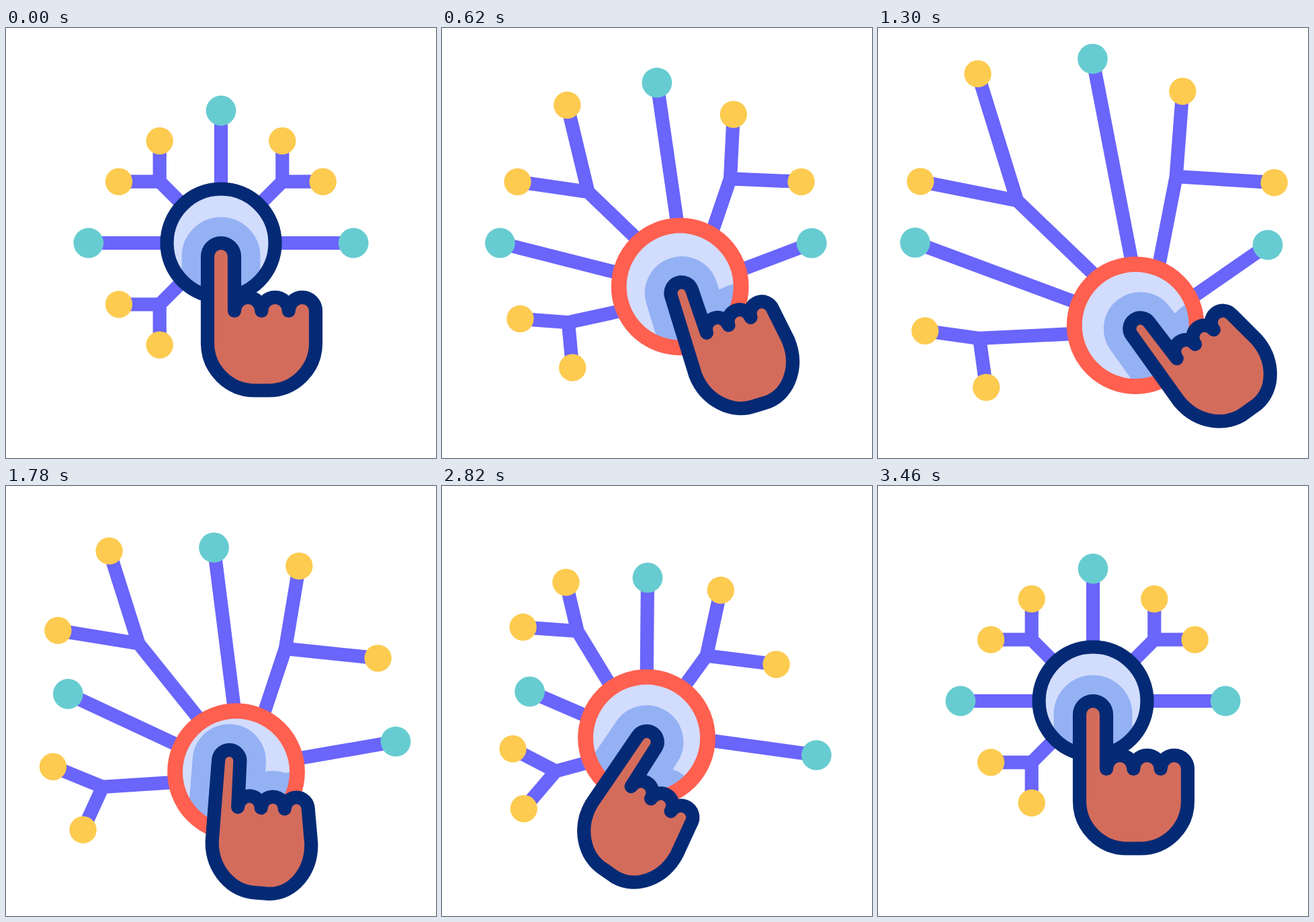
An HTML page for the animation above (3.6 s loop, 640x640 px).

```html
<!DOCTYPE html>
<html lang="en">
<head>
<meta charset="utf-8">
<title>Touch network</title>
<style>
html, body { margin: 0; width: 100%; height: 100%; overflow: hidden; background: #fff; }
svg { display: block; width: 100vw; height: 100vh; }
</style>
</head>
<body>
<svg viewBox="0 0 640 640">
  <defs><clipPath id="clip"><circle id="clipDisc"/></clipPath></defs>
  <path id="wires" fill="none" stroke="#6a65fb" stroke-width="20.2"/>
  <g id="dots"></g>
  <circle id="disc" fill="#d2dcfd"/>
  <g clip-path="url(#clip)">
    <path id="shade" fill="#94b1f4" stroke="#94b1f4" stroke-width="77" stroke-linejoin="round"/>
  </g>
  <circle id="ring" fill="none"/>
  <path id="hand" fill="#d46c5c" stroke="#042a75" stroke-width="20.2" stroke-linejoin="round"/>
</svg>
<script>
const LOOP = 3600, KEYS = [0, 1200, 2400, 3435], PRESS = 300;
const TEAL = '#67ccd1', YELLOW = '#fdcb50';
const NAVY = [4, 42, 117], RED = [255, 96, 80];
const el = id => document.getElementById(id);
const clamp = v => Math.min(1, Math.max(0, v));
const ease = v => { v = clamp(v); return v * v * (3 - 2 * v); };
const mix = (a, b, p) => a.map((v, i) => v + (b[i] - v) * p);
const set = (node, attrs) => { for (const k in attrs) node.setAttribute(k, attrs[k]); };
const fmt = p => p.map(v => v.toFixed(2)).join(' ');

// Each track holds three poses: rest, pulled right, pulled left.
const ringTrack = [[320, 320], [385, 443.3], [295.8, 406.3]];
const handTrack = [[376.5, 426.5, 0], [488.4, 477.6, -43], [269.1, 509.3, 45]];

// root: offset of the wire's end from the ring centre.
const branches = [
  { root: [[0, -68], [0, -66], [0, -80]],
    tips: [[[320, 123], [319.9, 43.8], [298.1, 144.1]]] },
  { root: [[-64, 0], [-64, -25], [-64, -34]],
    tips: [[[122.8, 320], [53.6, 319.9], [135, 298.1]]] },
  { root: [[64, 0], [64, -28], [64, -1]],
    tips: [[[517.2, 320], [580, 320.4], [580, 446.3]]] },
  { root: [[-50, -50], [-54, -68], [-46, -78]],
    fork: [[228.7, 228.7], [207.4, 257.8], [186.2, 208.8]],
    tips: [[[228.7, 168], [148.3, 66.9], [159.5, 129.4]],
           [[168, 228.7], [62.5, 229], [93.7, 199.5]]] },
  { root: [[50, -50], [29, -60], [36, -60]],
    fork: [[411.3, 228.7], [445, 220.2], [383.7, 266]],
    tips: [[[411.3, 168], [454.1, 93.1], [416.8, 147.7]],
           [[471.7, 228.7], [591.3, 229], [512.2, 286.4]]] },
  { root: [[-50, 50], [-64, 11], [-64, 16.5]],
    fork: [[228.7, 411.3], [151.3, 462.5], [135.7, 431.9]],
    tips: [[[168, 411.3], [70, 452.2], [70, 379.8]],
           [[228.7, 471.7], [163.2, 535.9], [61.2, 485.1]]] }
];

// Hand outline: fingertip, knuckles, palm; the last two points are palm corners.
const relaxed = [[300, 340], [340, 340], [340, 421], [380.3, 421], [420.7, 421], [461, 421],
  [461, 469], [390.5, 539.5], [370.5, 539.5], [300, 469], [461, 539.5], [300, 539.5]]
  .map(([x, y]) => [x - 376.5, y - 426.5]);
const pressed = [[317.8, 406.5], [350, 409], [345.5, 477], [380, 479], [415, 481], [450, 482],
  [453.5, 533], [390, 607], [370, 605], [306, 528], [454, 608], [304, 602]]
  .map(([x, y]) => [x - 384, y - 492.6]);

const arc = (a, b) => {
  const r = Math.hypot(b[0] - a[0], b[1] - a[1]) / 2;
  return `A${fmt([r, r])} 0 0 1 ${fmt(b)}`;
};
const corner = (a, c, b) => `C${fmt(mix(a, c, .552))} ${fmt(mix(b, c, .552))} ${fmt(b)}`;

function handPath(press) {
  const p = relaxed.map((v, i) => mix(v, pressed[i], press));
  return `M${fmt(p[0])}${arc(p[0], p[1])}L${fmt(p[2])}` +
    arc(p[2], p[3]) + arc(p[3], p[4]) + arc(p[4], p[5]) +
    `L${fmt(p[6])}${corner(p[6], p[10], p[7])}L${fmt(p[8])}${corner(p[8], p[11], p[9])}Z`;
}

for (const b of branches) {
  b.dots = b.tips.map(() => {
    const c = document.createElementNS('http://www.w3.org/2000/svg', 'circle');
    set(c, b.fork ? { r: 20.2, fill: YELLOW } : { r: 22.4, fill: TEAL });
    return el('dots').appendChild(c);
  });
}

function draw(t) {
  const seg = t < KEYS[1] ? 0 : t < KEYS[2] ? 1 : 2;
  const p = ease((t - KEYS[seg]) / (KEYS[seg + 1] - KEYS[seg]));
  const at = track => mix(track[seg], track[(seg + 1) % 3], p);
  const press = Math.min(ease(t / PRESS), ease((KEYS[3] - t) / PRESS));

  const c = at(ringTrack), scale = 1 + .13 * press;
  const place = { cx: c[0], cy: c[1], r: 80.5 * scale };
  set(el('disc'), place);
  set(el('clipDisc'), place);
  set(el('ring'), { ...place, 'stroke-width': 20.2 * scale,
    stroke: `rgb(${mix(NAVY, RED, press).map(Math.round)})` });

  let d = '';
  for (const b of branches) {
    const off = at(b.root), root = [c[0] + off[0], c[1] + off[1]];
    const tips = b.tips.map(at);
    if (b.fork) {
      const f = fmt(at(b.fork));
      d += `M${fmt(tips[0])}L${f}L${fmt(tips[1])}M${f}L${fmt(root)}`;
    } else {
      d += `M${fmt(tips[0])}L${fmt(root)}`;
    }
    tips.forEach((v, i) => set(b.dots[i], { cx: v[0], cy: v[1] }));
  }
  set(el('wires'), { d });

  const [x, y, angle] = at(handTrack);
  const pose = { d: handPath(press), transform: `translate(${x} ${y}) rotate(${angle})` };
  set(el('hand'), pose);
  set(el('shade'), pose);
}

const start = performance.now();
function tick() {
  draw((performance.now() - start) % LOOP);
  requestAnimationFrame(tick);
}
tick();
</script>
</body>
</html>
```
